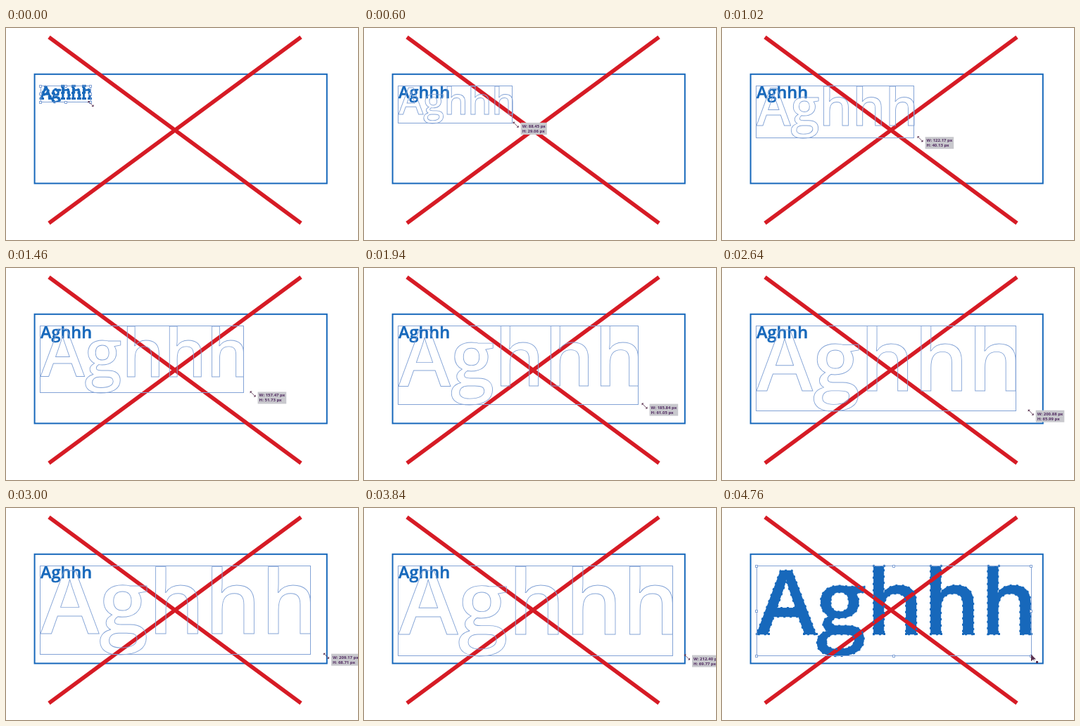
An HTML page with a canvas for the animation above (4780 ms loop, 500x302 px).

```html
<!DOCTYPE html>
<html>
<head>
<meta charset="utf-8">
<style>
  html, body { margin: 0; height: 100%; overflow: hidden; background: #fff; }
  canvas { display: block; }
</style>
</head>
<body>
<canvas id="stage" width="500" height="302"></canvas>
<script>
const ctx = document.getElementById('stage').getContext('2d');
const LOOP = 4780, DRAG_START = 150, DRAG_END = 4000, RETURN = 300;
const WORD = 'Aghhh', FONT = '"Open Sans", sans-serif';
const LEFT = 49, TOP = 82.5, UNIT = 1.836, RATIO = 0.3285;
const BLUE = '#1768bb', THIN = '#83a3d6', RED = '#d61b25', DARK = '#59304f';

// Key points of the drag: time, word width in label units, pointer x
const DRAG = [
  [DRAG_START, 38.9, 120.5],
  [600, 88.37, 215.5],
  [1460, 157.41, 350.5],
  [1940, 185.82, 398.5],
  [2340, 193.94, 425],
  [3000, 209.16, 455],
  [3240, 212.4, 459]
];

function pose(t) {
  const last = DRAG.length - 1;
  const i = DRAG.findIndex(key => key[0] > t);
  const b = i < 0 ? DRAG[last] : DRAG[i];
  const a = i < 0 ? b : DRAG[Math.max(0, i - 1)];
  const p = a === b ? 0 : (t - a[0]) / (b[0] - a[0]);
  const value = a[1] + (b[1] - a[1]) * p;
  const w = value * UNIT, h = w * RATIO;
  const back = Math.min(1, Math.max(0, (t - DRAG_END) / RETURN));
  const x = a[2] + (b[2] - a[2]) * p - 20 * back;
  return { value, w, h, x, y: TOP + h + 2 - 4 * back };
}

function line(points, color, width) {
  ctx.strokeStyle = color;
  ctx.lineWidth = width;
  ctx.beginPath();
  points.forEach(([x, y]) => ctx.lineTo(x, y));
  ctx.stroke();
}

function shape(points, color) {
  ctx.fillStyle = color;
  ctx.beginPath();
  points.forEach(([x, y]) => ctx.lineTo(x, y));
  ctx.fill();
}

function frame(x, y, w, h, color, width) {
  ctx.strokeStyle = color;
  ctx.lineWidth = width;
  ctx.strokeRect(x, y, w, h);
}

// Places the word so that its ink starts at LEFT, TOP and is `width` wide
function word(width, method) {
  ctx.font = `600 1000px ${FONT}`;
  const m = ctx.measureText(WORD);
  const k = width / (m.actualBoundingBoxLeft + m.actualBoundingBoxRight);
  ctx.font = `600 ${1000 * k}px ${FONT}`;
  ctx[method](WORD, LEFT + m.actualBoundingBoxLeft * k, TOP + m.actualBoundingBoxAscent * k);
}

function outline(width, color, weight) {
  ctx.strokeStyle = color;
  ctx.lineWidth = weight;
  ctx.miterLimit = 3;
  word(width, 'strokeText');
}

function square(x, y, color) {
  ctx.fillStyle = color;
  ctx.fillRect(Math.round(x - 1.5), Math.round(y - 1.5), 3, 3);
}

function selection(w, h) {
  // Anchor points: dashes along the curves, squares at the feet and tops of the stems
  ctx.setLineDash([3, 6]);
  outline(w, BLUE, 2.4);
  ctx.setLineDash([]);
  const anchor = (x, y) => square(LEFT + x * w, TOP + y * h, BLUE);
  [0, 0.044, 0.174, 0.218].forEach(x => anchor(x, 0.76));
  for (let stem = 0.426; stem < 0.9; stem += 0.209) {
    [0, 0.039, 0.118, 0.157].forEach(x => anchor(stem + x, 0.76));
    [0, 0.039].forEach(x => anchor(stem + x, 0));
  }

  frame(LEFT + 0.5, TOP, Math.round(w), Math.round(h), THIN, 1);
  for (const i of [0, 0.5, 1]) for (const j of [0, 0.5, 1]) {
    if (i === 0.5 && j === 0.5) continue;
    const x = Math.round(LEFT + i * w) - 1.5, y = Math.round(TOP + j * h) - 1.5;
    ctx.fillStyle = '#fff';
    ctx.fillRect(x, y, 3, 3);
    frame(x, y, 3, 3, THIN, 1);
  }
}

function resizePointer(x, y) {
  line([[x - 3, y - 3], [x + 3, y + 3]], DARK, 0.8);
  for (const s of [-1, 1]) {
    shape([[x + 4 * s, y + 4 * s], [x + 4 * s, y + s], [x + s, y + 4 * s]], DARK);
  }
}

function arrowPointer(x, y) {
  shape([[x, y], [x, y + 10], [x + 3, y + 7], [x + 5, y + 11], [x + 4, y + 7], [x + 7, y + 7]], DARK);
  square(x + 8.5, y + 10.5, DARK);
}

function sizeLabel(x, y, value) {
  const rows = [`W: ${value.toFixed(2)} px`, `H: ${(value * RATIO).toFixed(2)} px`];
  ctx.font = `700 6px ${FONT}`;
  ctx.fillStyle = '#c8c8cd';
  ctx.fillRect(x, y, ctx.measureText(rows[0]).width + 4, 17);
  ctx.fillStyle = '#502a60';
  rows.forEach((row, i) => ctx.fillText(row, x + 2, y + 7 + i * 7));
}

function draw(t) {
  const { value, w, h, x, y } = pose(t);
  const dragging = t >= DRAG_START && t < DRAG_END;
  const filled = dragging ? DRAG[0][1] * UNIT : w;

  ctx.fillStyle = '#fff';
  ctx.fillRect(0, 0, 500, 302);
  frame(40.6, 65.8, 415.2, 155.6, BLUE, 2);
  ctx.fillStyle = BLUE;
  word(filled, 'fillText');
  outline(filled, BLUE, 0.5);
  line([[61, 13], [419, 278]], RED, 5.7);
  line([[419, 13], [61, 278]], RED, 5.7);

  if (dragging) {
    outline(w, THIN, 0.9);
    frame(LEFT - 0.5, TOP, Math.round(w), Math.round(h), THIN, 1);
    if (t > 2200 && t < 2560) line([[419, 13], [419, 280]], '#b9bcc4', 1.5);
    sizeLabel(x + 7, y - 3, value);
  } else {
    selection(w, h);
  }
  (t < DRAG_END ? resizePointer : arrowPointer)(x, y);
}

const start = performance.now();
function tick() {
  draw((performance.now() - start) % LOOP);
  requestAnimationFrame(tick);
}
tick();
</script>
</body>
</html>
```
